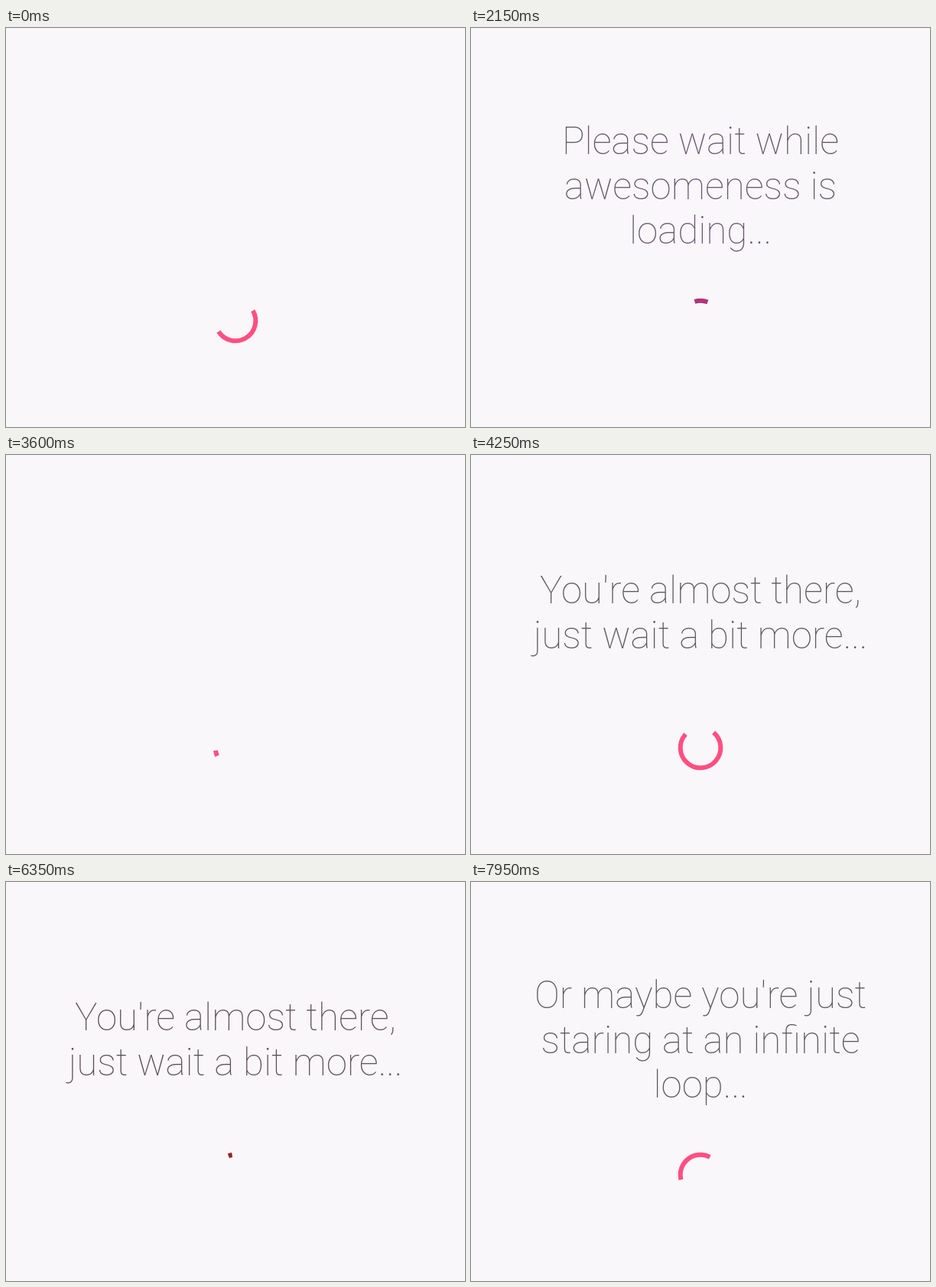
Write an HTML page with a canvas that moves like this. It is 600 px wide and 522 px high and loops after 8 s.

```html
<!DOCTYPE html>
<html lang="en">
<head>
<meta charset="utf-8">
<title>Loading screen</title>
<style>
  html, body { margin: 0; width: 100%; height: 100%; overflow: hidden; background: #f9f7fa; }
  canvas { display: block; }
</style>
</head>
<body>
<canvas id="stage" width="600" height="522"></canvas>
<script>
const ctx = document.getElementById('stage').getContext('2d');
const LOOP = 8000;

const clamp01 = v => Math.min(1, Math.max(0, v));

// Same curve as CSS cubic-bezier(), solved by bisection.
function cubicBezier(x1, y1, x2, y2) {
  const at = (a, b, s) => 3 * (1 - s) ** 2 * s * a + 3 * (1 - s) * s * s * b + s ** 3;
  return x => {
    let low = 0, high = 1;
    for (let i = 0; i < 24; i++) {
      const mid = (low + high) / 2;
      if (at(x1, x2, mid) < x) low = mid; else high = mid;
    }
    return at(y1, y2, low);
  };
}
const ease = cubicBezier(0.25, 0.1, 0.25, 1);
const fastOutSlowIn = cubicBezier(0.4, 0, 0.2, 1);

// Colours run from left to right, three stops each.
const theme = (ring, text) => ({ ring, text });
const GRAY = [0x5c, 0x58, 0x5b];
const plain = color => [color, color, color];
const PINK = theme(plain([255, 79, 129]), plain(GRAY));
const PLUM = theme(plain([92, 19, 116]), [GRAY, [125, 80, 145], GRAY]);
const VIOLET = theme([[160, 36, 126], [132, 32, 126], [112, 28, 124]],
                     [GRAY, [122, 105, 155], [122, 108, 158]]);
const RED = theme(plain([154, 34, 25]), plain([92, 78, 80]));
const CYCLES = [PINK, PLUM, PINK, PINK, VIOLET, RED, PINK];

const MESSAGES = [
  { enter: 20, leave: 3155, lines: ['Please wait while', 'awesomeness is', 'loading...'] },
  { enter: 3620, leave: 6755, lines: ["You're almost there,", 'just wait a bit more...'] },
  { enter: 7215, leave: Infinity, lines: ["Or maybe you're just", 'staring at an infinite', 'loop...'] }
];
const FADE = 300, RISE = 45;
const FONT_SIZE = 49.3, LINE_HEIGHT = 58.6, MIDDLE_BASELINE = 223.6;

const RING = { x: 300, y: 383, radius: 26.3, width: 6 };
const HALF_CYCLE = 666.5, GROW_START = 1065;
const SPIN_TIME = 1576, START_ANGLE = 244.6;

function gradient(x0, x1, from, to, p) {
  const fill = ctx.createLinearGradient(x0, 0, x1, 0);
  from.forEach((color, i) => {
    const mixed = color.map((v, k) => Math.round(v + (to[i][k] - v) * p));
    fill.addColorStop(i / 2, `rgb(${mixed})`);
  });
  return fill;
}

function drawMessage({ enter, leave, lines }, t) {
  const hidden = Math.max(1 - clamp01((t - enter) / FADE), clamp01((t - leave) / FADE));
  if (hidden === 1) return;
  ctx.globalAlpha = 1 - hidden;
  const top = MIDDLE_BASELINE - (lines.length - 1) / 2 * LINE_HEIGHT - RISE * ease(hidden);
  lines.forEach((line, i) => ctx.fillText(line, 300, top + i * LINE_HEIGHT));
  ctx.globalAlpha = 1;
}

function drawRing(t, halfCycles) {
  const step = Math.floor(halfCycles);
  const p = fastOutSlowIn(halfCycles - step);
  const growing = step % 2 === 0;
  const length = 10 + 270 * (growing ? p : 1 - p);
  const center = START_ANGLE + 360 * t / SPIN_TIME + 135 * (step + p);
  const radians = degrees => degrees * Math.PI / 180;
  ctx.lineWidth = RING.width;
  ctx.beginPath();
  ctx.arc(RING.x, RING.y, RING.radius, radians(center - length / 2), radians(center + length / 2));
  ctx.stroke();
}

function draw(t) {
  const halfCycles = (t - GROW_START) / HALF_CYCLE;
  const cycle = halfCycles / 2 + 1;
  const index = Math.floor(cycle);
  const now = CYCLES[index], next = CYCLES[index + 1] || now;
  const blend = clamp01((cycle - index - 0.6) / 0.4);

  ctx.fillStyle = '#f9f7fa';
  ctx.fillRect(0, 0, 600, 522);

  ctx.font = `100 ${FONT_SIZE}px Roboto, sans-serif`;
  ctx.textAlign = 'center';
  ctx.fillStyle = gradient(80, 520, now.text, next.text, blend);
  MESSAGES.forEach(message => drawMessage(message, t));

  ctx.strokeStyle = gradient(271, 329, now.ring, next.ring, blend);
  drawRing(t, halfCycles);
}

const start = performance.now();
function tick() {
  draw((performance.now() - start) % LOOP);
  requestAnimationFrame(tick);
}
tick();
</script>
</body>
</html>
```
